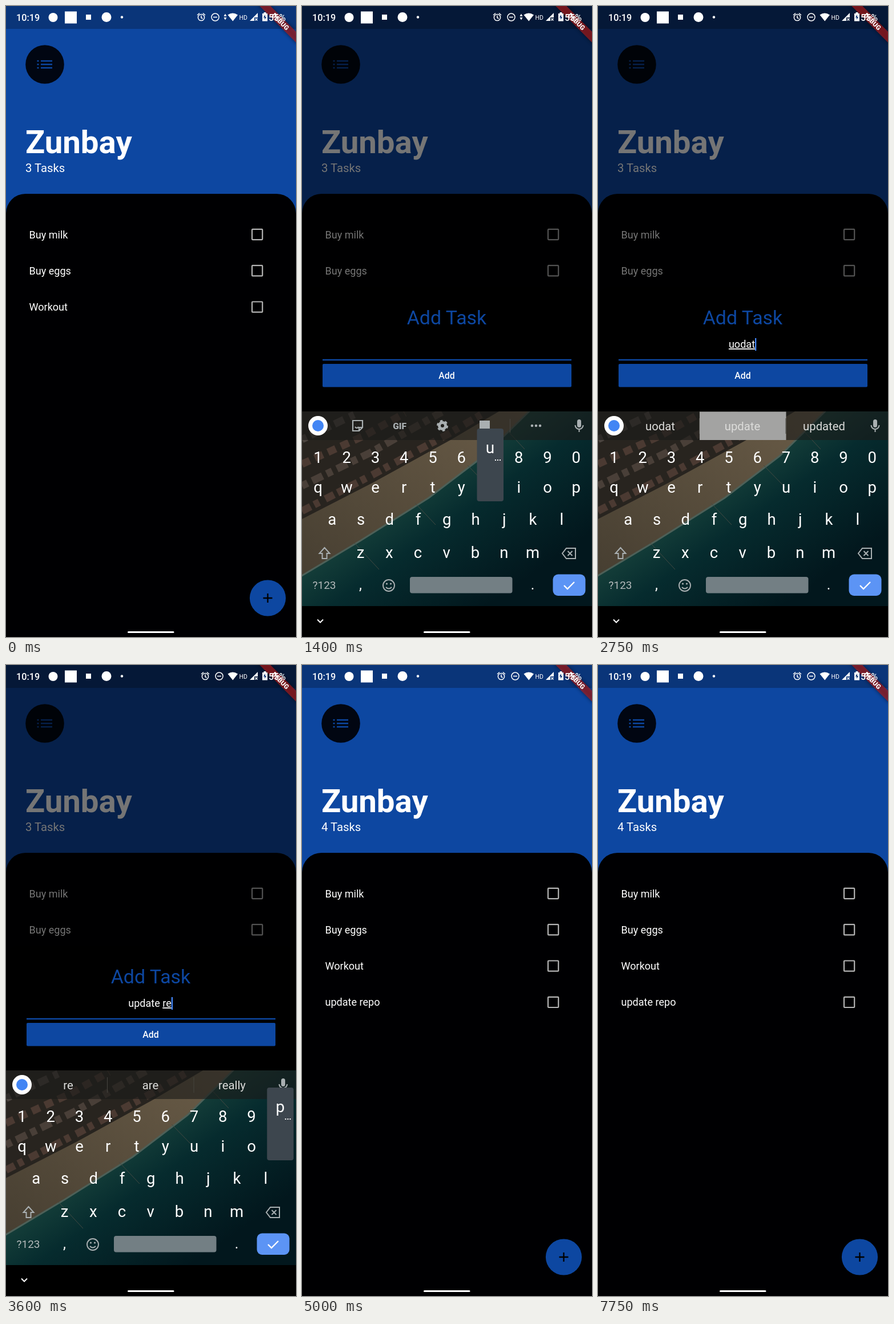
Animation of 508x1102 px, one loop 8 s. Source, as an HTML page:

```html
<!DOCTYPE html>
<html lang="en">
<head>
<meta charset="utf-8">
<title>Task list</title>
<style>
  html, body { margin: 0; width: 100%; height: 100%; overflow: hidden; background: #000; }
  svg { display: block; width: 100vw; height: 100vh; }
  text { font-family: Roboto, sans-serif; fill: #fff; white-space: pre; }
  .mid { text-anchor: middle; }
  .line { fill: none; stroke: currentColor; }
  .grey { fill: #a9afb1; color: #a9afb1; }
  .white { fill: #fff; color: #fff; }
</style>
</head>
<body>
<svg viewBox="0 0 508 1102">
  <defs>
    <linearGradient id="sea" gradientUnits="userSpaceOnUse" x1="220" y1="845" x2="350" y2="1030">
      <stop offset="0" stop-color="#133c38"/><stop offset=".3" stop-color="#062b2e"/><stop offset="1" stop-color="#02171d"/>
    </linearGradient>
    <linearGradient id="sand" x1="1" y1="0" x2="0" y2="1">
      <stop offset="0" stop-color="#6b5d48"/><stop offset="1" stop-color="#463e31"/>
    </linearGradient>
    <filter id="soft" x="-20%" y="-100%" width="140%" height="300%"><feGaussianBlur stdDeviation="3"/></filter>
    <clipPath id="photo"><path d="M0 708H508V1048H0z"/></clipPath>
  </defs>

  <!-- Task list -->
  <path fill="#0d47a1" d="M0 0H508V400H0z"/>
  <path fill-opacity=".25" d="M0 0H508V40H0z"/>
  <circle cx="68" cy="102" r="33.8" fill="#010612"/>
  <path stroke="#0d47a1" stroke-width="2.6" d="M54.5 96h3m3.5 0h20M54.5 102h3m3.5 0h20M54.5 108h3m3.5 0h20"/>
  <text x="34" y="257" font-size="56.4" font-weight="700">Zunbay</text>
  <text id="count" x="34" y="290" font-size="20.3"></text>
  <path fill="#000002" d="M0 1102V362A34 34 0 0 1 34 328H474A34 34 0 0 1 508 362V1102z"/>
  <g id="rows"></g>
  <circle cx="458.5" cy="1034" r="31.6" fill="#0d47a1"/>
  <path stroke="#000" stroke-width="2.3" d="M450.5 1034h16m-8-8v16"/>
  <path id="scrim" d="M0 0H508V1102H0z"/>

  <!-- Add sheet -->
  <g id="sheet">
    <path d="M0 1110V513A23 23 0 0 1 23 490H485A23 23 0 0 1 508 513V1110z"/>
    <text class="mid" x="253.5" y="556" font-size="33.9" style="fill:#0d47a1">Add Task</text>
    <text id="field" class="mid" x="252" y="597" font-size="18.06"><tspan></tspan><tspan text-decoration="underline"></tspan></text>
    <path id="caret" fill="#448aff" d="M0 580h2.2v22h-2.2z"/>
    <path id="rule" d="M36 618H472"/>
    <rect x="36" y="625" width="436" height="40.5" rx="2" fill="#0d47a1"/>
    <text class="mid" x="253.5" y="650.5" font-size="15.8" font-weight="500">Add</text>
  </g>

  <!-- Keyboard -->
  <g id="board">
    <path d="M0 708H508V1110H0z"/>
    <g clip-path="url(#photo)">
      <path fill="url(#sea)" d="M0 708H508V1048H0z"/>
      <path fill="url(#sand)" stroke="#4d6058" stroke-width="3" d="M-9 1000L102 934L222 859L318 786L406 700H-9z"/>
      <path fill="#28241f" d="M0 708V896L125 832L260 758L345 708z"/>
      <g fill="none" stroke-width="13" stroke="#4b3a32">
        <path stroke-dasharray="17 7 10 12" d="M0 882L125 818L255 748L320 710"/>
        <path stroke-dasharray="11 9 20 8" stroke="#493f38" d="M0 838L120 780L245 709"/>
        <path stroke-dasharray="15 10" d="M0 800L110 750L180 711"/>
        <path stroke-dasharray="9 8 18 11" stroke="#4c4540" d="M0 757L95 712"/>
      </g>
      <path stroke="#434a43" d="M92 938l43 46M198 868l36 38M290 802l38 39M362 744l28 30"/>
    </g>
    <path fill="#1b1a19" fill-opacity=".62" d="M0 708H508V758H0z"/>
    <circle cx="28" cy="733" r="17" fill="#fff"/>
    <circle cx="28" cy="733" r="10" fill="#4285f4"/>
    <g id="tools" class="grey">
      <path class="line" stroke-width="2.2" d="M89 724h17v12l-6 6h-11zM106 736h-6v6M94 730h.1m6 0h.1M93 735q3 4 6 0"/>
      <text class="mid" x="171" y="738.5" font-size="15.5" font-weight="900" style="fill:#a9afb1">GIF</text>
      <circle class="line" cx="246" cy="733" r="5.5" stroke-width="5"/>
      <circle class="line" cx="246" cy="733" r="8.5" stroke-width="3" stroke-dasharray="4.45"/>
      <rect x="311" y="724" width="18" height="18"/>
      <path fill="#45443f" d="M364 721h1v24h-1z"/>
      <circle cx="403" cy="733" r="2.3"/><circle cx="410" cy="733" r="2.3"/><circle cx="417" cy="733" r="2.3"/>
    </g>
    <g id="hints">
      <path id="picked" fill="#a3a3a2" d="M178 708.5H329.5V758H178z"/>
      <path stroke="#45443f" d="M177.5 720v27M329 720v27"/>
    </g>
    <g class="grey">
      <rect x="482" y="722" width="7" height="14" rx="3.5"/>
      <path class="line" stroke-width="2" d="M478.5 732a7 7 0 0 0 14 0M485.5 739v5"/>
    </g>
    <g id="keys"></g>
    <g class="grey">
      <path class="line" stroke-width="2" d="M39.5 946l-9 10h5v9h8v-9h5zM463 947h16v18h-16l-7-9zM465.5 952l8 8m0-8l-8 8"/>
      <text class="mid" x="39" y="1018" font-size="19" style="fill:#b4babb">?123</text>
      <circle class="line" cx="152" cy="1012" r="10" stroke-width="2"/>
      <circle cx="148.5" cy="1009" r="1.6"/><circle cx="155.5" cy="1009" r="1.6"/>
      <path class="line" stroke-width="2" d="M147 1015q5 5 10 0"/>
      <rect x="189" y="997" width="179.5" height="28.5" rx="4" fill="#737f84"/>
    </g>
    <rect x="439.5" y="992.5" width="57" height="37.5" rx="9" fill="#5c94f5"/>
    <path class="line white" style="fill:none" stroke-width="2.4" d="M459 1012l6 6l12-12"/>
    <g id="popup">
      <rect x="-23" y="-103" width="46.5" height="127" rx="4" fill="#3d464e"/>
      <text class="mid" y="-60" font-size="28"></text>
      <path fill="#fff" d="M8.5 -49h2v2h-2zm4 0h2v2h-2zm4 0h2v2h-2z"/>
    </g>
  </g>

  <!-- System bars -->
  <path id="hide" class="line white" style="fill:none" stroke-width="2" d="M27 1071.5l5 5l5-5"/>
  <rect x="213" y="1092" width="81.5" height="3" rx="1.5" fill="#fff"/>
  <g transform="translate(508 0) rotate(45)">
    <rect x="-50" y="31.6" width="100" height="13.5" opacity=".5" filter="url(#soft)"/>
    <rect x="-50" y="31.6" width="100" height="13.5" fill="#b71c1c" fill-opacity=".63"/>
    <text class="mid" y="42.5" font-size="11.5" font-weight="900">DEBUG</text>
  </g>
  <g class="white">
    <text x="18" y="26" font-size="16.2" font-weight="500">10:19</text>
    <circle cx="82.5" cy="20" r="8"/>
    <path d="M103 9.5h21v21h-21zM140 15h9v9h-9z"/>
    <circle cx="176" cy="19.5" r="8.5"/>
    <circle cx="203" cy="19.5" r="2.2"/>
    <g id="quiet">
      <circle class="line" cx="349" cy="20" r="5.6" stroke-width="1.5"/>
      <path class="line" stroke-width="1.5" d="M349 16.5v4l2.5 1.5M342 16l4-3.5m6 0l4 3.5"/>
      <circle class="line" cx="373.5" cy="19.5" r="6.5" stroke-width="1.5"/>
      <path class="line" stroke-width="1.6" d="M370 19.5h7"/>
    </g>
    <path id="arrows" d="M381.5 18l2.5-4.5l2.5 4.5zM381.5 20l2.5 4.5l2.5-4.5z"/>
    <path d="M388.5 15.5q8.5-6 17.5 0l-8.7 11z"/>
    <text x="408.5" y="23.5" font-size="10.5">HD</text>
    <path d="M427 26L441 12v8h-6v6z"/>
    <path class="line" stroke-width="1.3" d="M436.5 21.5l4 4m0-4l-4 4"/>
    <path d="M449 13h2.5v-2h4v2h2.5v13.5h-9z"/>
    <path fill="#0a3070" d="M454 15l-3 5h2v4l3-5h-2z"/>
    <text x="460" y="26" font-size="16" font-weight="500">55%</text>
  </g>
</svg>
<script>
const $ = id => document.getElementById(id);
const clamp = v => Math.max(0, Math.min(1, v));
const ramp = (t, a, b) => clamp((t - a) / (b - a));
const smooth = p => p * p * (3 - 2 * p);
const show = (el, on) => el.setAttribute('visibility', on ? 'inherit' : 'hidden');
const move = (el, x, y) => el.setAttribute('transform', `translate(${x} ${y})`);

// Task rows
$('rows').innerHTML = ['Buy milk', 'Buy eggs', 'Workout', 'update repo'].map((name, i) => `
  <g transform="translate(0 ${399 + i * 63.3})">
    <text x="40.5" y="6.5" font-size="18.06">${name}</text>
    <rect x="431" y="-9.1" width="18.2" height="18.2" rx="1" fill="none" stroke="#b3b3b3" stroke-width="2.2"/>
  </g>`).join('');
const newRow = $('rows').lastElementChild;
newRow.insertAdjacentHTML('beforeend', `
  <rect x="430" y="-10.1" width="20.2" height="20.2" rx="1" fill="#0d47a1"/>
  <path class="line white" style="fill:none" stroke-width="2.2" pathLength="1" stroke-dasharray="1 2" d="M433 0l5 5l9.5-9.5"/>`);
const [newName, , boxFill, tick] = newRow.children;

// Keys
const keyAt = {};
[['1234567890', 28, 788], ['qwertyuiop', 28, 841], ['asdfghjkl', 52.8, 897], ['zxcvbnm', 102.5, 955]]
  .forEach(([row, x, y]) => [...row].forEach((k, i) => keyAt[k] = [x + i * 50.25, y]));
const label = (k, x, y, size) => `<text class="mid" x="${x}" y="${y}" font-size="${size}">${k}</text>`;
$('keys').innerHTML = Object.entries(keyAt)
  .map(([k, [x, y]]) => label(k, x, y + (y < 800 ? 9.5 : 9), 27.5)).join('') +
  label(',', 102.5, 1019, 25) + label('.', 404, 1019, 25);
$('hints').insertAdjacentHTML('beforeend', [109, 253, 396].map(x => label('', x, 741, 20.3)).join(''));
const hintWords = [...$('hints').querySelectorAll('text')];
hintWords.forEach(w => w.style.fill = '#dcdcda');

// Time, settled text, word in progress, suggestions
const edits = [
  [750, '', '', ''],
  [1450, '', 'u', 'u you your'],
  [1700, '', 'uo', 'uo up you'],
  [1900, '', 'uod', 'uod update updated'],
  [2050, '', 'uoda', 'uoda update updated'],
  [2400, '', 'uodat', 'uodat update updated'],
  [2850, 'update ', '', 'on the me'],
  [3250, 'update ', 'r', 'r are for'],
  [3450, 'update ', 're', 're are really'],
  [3700, 'update ', 'rep', 'rep report reply'],
  [3950, 'update ', 'repo', 'repo report reports'],
];
const presses = [
  ['u', 1300, 1450], ['o', 1550, 1700], ['d', 1750, 1900], ['a', 1950, 2050], ['t', 2200, 2400],
  ['r', 3100, 3250], ['e', 3300, 3450], ['p', 3550, 3700], ['o', 3800, 3950],
];

function drawField(t) {
  const [since, done, word, hints] = edits.findLast(e => e[0] <= t) || edits[0];
  const [a, b] = $('field').children;
  a.textContent = done;
  b.textContent = word;
  move($('caret'), 252 + $('field').getComputedTextLength() / 2, 0);
  show($('caret'), t >= 750 && t < 4800 && Math.floor((t - since) / 500) % 2 === 0);
  show($('tools'), !hints);
  show($('hints'), hints);
  hints.split(' ').forEach((w, i) => hintWords[i].textContent = w);
  show($('picked'), t >= 2750 && t < 2850);
}

function draw(t) {
  const closing = ramp(t, 4750, 5000);
  const open = t >= 500 && t < 5000;

  $('count').textContent = (t < 4700 ? 3 : 4) + ' Tasks';
  show(newRow, t >= 4700);
  const check = ramp(t, 5600, 5850) - ramp(t, 6600, 6850);
  boxFill.setAttribute('opacity', clamp(check * 2));
  tick.setAttribute('stroke-dashoffset', 1 - clamp(check * 2 - 1));
  show(tick, check > .5);
  newName.setAttribute('text-decoration', t >= 5650 && t < 6650 ? 'line-through' : 'none');

  $('scrim').setAttribute('opacity', .54 * ramp(t, 450, 650) * (1 - closing));
  const slide = 1 - (1 - ramp(t, 450, 700)) ** 2;
  const lift = smooth(ramp(t, 662, 950));
  move($('sheet'), 0, 394 * (1 - lift) + 218 * (1 - slide) + 612 * closing ** 1.5);
  show($('sheet'), open);
  const focused = t >= 750;
  $('rule').setAttribute('stroke', focused ? '#0d47a1' : '#999');
  $('rule').setAttribute('stroke-width', focused ? 2.3 : 1.1);

  const rise = ramp(t, 600, 800), drop = ramp(t, 4750, 4900);
  show($('board'), open && rise > 0 && drop < 1);
  move($('board'), 0, 280 * (1 - rise) ** 2 + 140 * drop);
  $('board').setAttribute('opacity', clamp(rise * 1.3) * (1 - drop));
  const press = presses.find(p => t >= p[1] && t < p[2]);
  show($('popup'), press);
  if (press) {
    move($('popup'), ...keyAt[press[0]]);
    $('popup').children[1].textContent = press[0];
  }
  drawField(t);

  show($('hide'), t >= 700 && t < 4700);
  const syncing = t < 2150;
  show($('arrows'), syncing);
  move($('quiet'), syncing ? -7 : 0, 0);
}

// The screen refreshes every 50 ms
const start = performance.now();
function play(now) {
  draw(Math.floor(Math.max(0, now - start) % 8000 / 50) * 50);
  requestAnimationFrame(play);
}
draw(0);
requestAnimationFrame(play);
</script>
</body>
</html>
```
